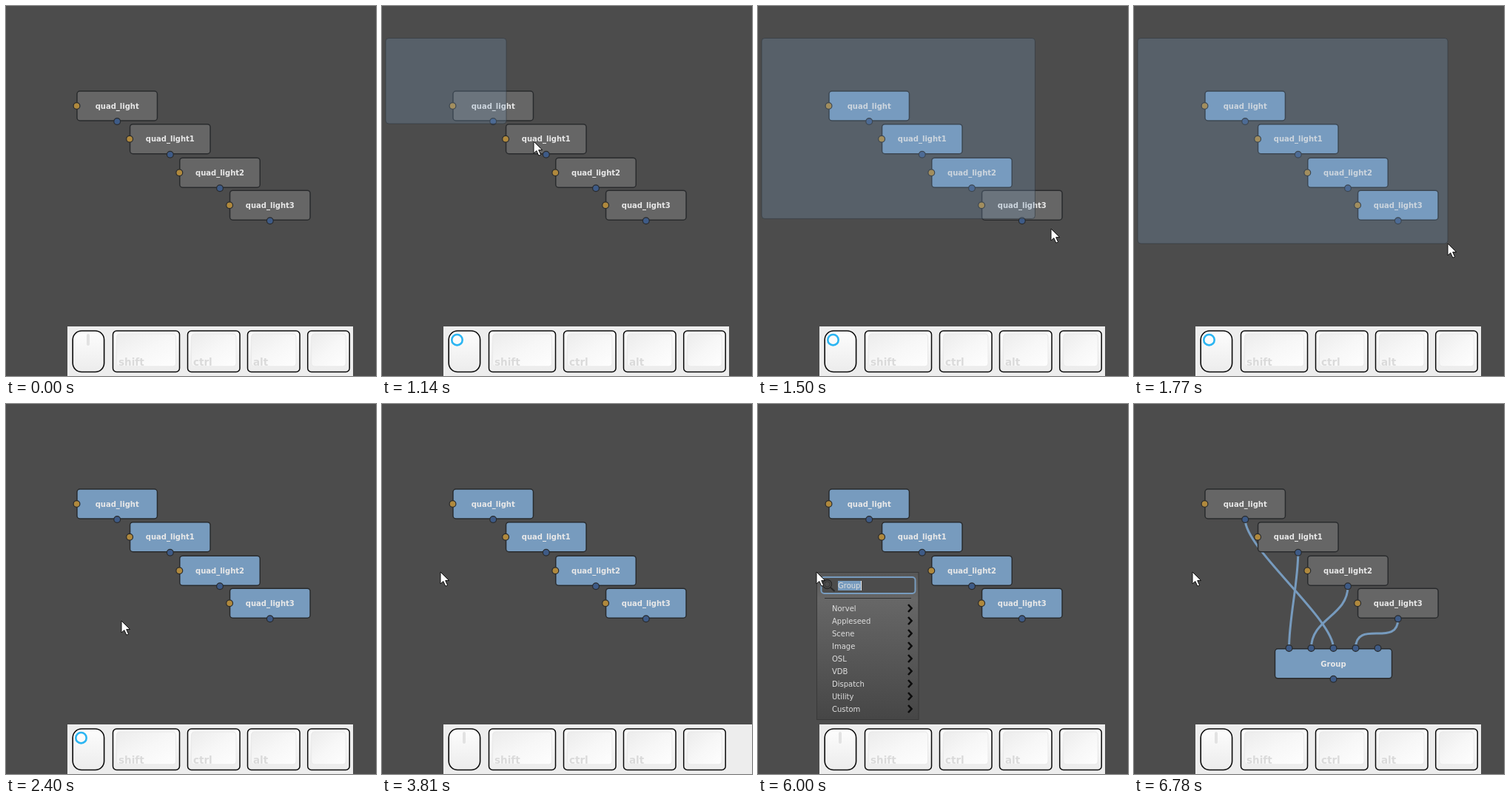
Animation, 500 px wide and 500 px high, one loop 8250 ms. Source, as an HTML page:

```html
<!DOCTYPE html>
<html lang="en">
<head>
<meta charset="utf-8">
<title>Grouping lights in a node graph</title>
<style>
  html, body { margin: 0; width: 100%; height: 100%; overflow: hidden; background: #4c4c4c; }
  svg { display: block; width: 100%; height: 100%; }
  text { font-family: "DejaVu Sans", sans-serif; font-size: 10px; fill: #dedede; }
  .title { font-weight: bold; text-anchor: middle; fill: #e8e8e8; }
  .node { stroke: #292b2d; stroke-width: 1.5; }
  .port { stroke: #292b2d; stroke-width: 1.2; }
  .wire { fill: none; stroke: #779bbe; stroke-width: 3; }
  .cap { font-weight: bold; font-size: 13.5px; fill: #dadada; }
  .cap.down { fill: #222; }
</style>
</head>
<body>
<svg id="stage" viewBox="0 0 500 500">
  <defs>
    <linearGradient id="menuFill" x1="0" y1="0" x2="0" y2="1">
      <stop offset="0" stop-color="#565656"/>
      <stop offset=".18" stop-color="#676767"/>
      <stop offset="1" stop-color="#464646"/>
    </linearGradient>
    <linearGradient id="keyFill" x1="0" y1="0" x2="0" y2="1">
      <stop offset="0" stop-color="#fdfdfd"/>
      <stop offset="1" stop-color="#ececec"/>
    </linearGradient>
    <linearGradient id="plateFill" x1="0" y1="0" x2="1" y2="1">
      <stop offset="0" stop-color="#ececec"/>
      <stop offset=".5" stop-color="#f7f7f7"/>
      <stop offset="1" stop-color="#fefefe"/>
    </linearGradient>
  </defs>
  <rect width="500" height="500" fill="#4c4c4c"/>
  <g id="wires"></g>
  <g id="nodes"></g>
  <rect id="marquee" x="5" y="43.5" rx="4" fill="#789bbe" fill-opacity=".25" stroke="#30363c" stroke-opacity=".6"/>
  <g id="menu"></g>
  <g id="keys"></g>
  <path id="pointer" d="M0 0V16L3.8 12.6L6.8 19.2L9.6 18L6.7 11.6H11.7Z" fill="#fff" stroke="#111" stroke-width="1" stroke-linejoin="round"/>
</svg>
<script>
const LOOP = 8250, STEP = 30;
const MOVE_IN = 480, PRESS = 840, RELEASE = 1980, RING_OFF = 2550;
const TAB_DOWN = 3240, TAB_UP = 3810, MENU_OPEN = 4320;
const ENTER_DOWN = 6210, GROUPED = 6240, ENTER_UP = 6780;
const GRAY = '#666666', BLUE = '#779bbe';

const byId = id => document.getElementById(id);

function add(parent, tag, attrs, label) {
  const el = document.createElementNS('http://www.w3.org/2000/svg', tag);
  for (const name in attrs) el.setAttribute(name, attrs[name]);
  if (label) el.textContent = label;
  parent.appendChild(el);
  return el;
}

const show = (el, on) => el.setAttribute('visibility', on ? 'visible' : 'hidden');

// Node graph
function port(parent, cx, cy, fill) {
  add(parent, 'circle', { cx, cy, r: 4.4, fill, class: 'port' });
}

function addNode(label, cx, cy, width) {
  const g = add(byId('nodes'), 'g', {});
  const body = add(g, 'rect', {
    x: cx - width / 2, y: cy - 20, width, height: 40, rx: 4, fill: GRAY, class: 'node'
  });
  add(g, 'text', { x: cx, y: cy + 3.7, class: 'title' }, label);
  port(g, cx, cy + 21, '#3e5b87');
  return { g, body, cx, cy, right: cx + width / 2, bottom: cy + 20 };
}

const lights = [[150.2, 135], [221.8, 179.7], [289, 225.2], [356.8, 269.2]].map(([x, y], i) => {
  const node = addNode('quad_light' + (i || ''), x, y, 108.5);
  port(node.g, x - 54.7, y, '#b0893d');
  return node;
});

const group = addNode('Group', 269.5, 350.8, 158);
group.body.setAttribute('fill', BLUE);
const inputX = i => 209.5 + 30 * i;
for (let i = 0; i < 5; i++) port(group.g, inputX(i), 330, '#3e5b87');

const wires = byId('wires');
[2, 0, 1, 3].forEach((slot, i) => {
  const { cx, bottom } = lights[i], y = bottom + 1, x = inputX(slot);
  add(wires, 'path', { class: 'wire', d: `M${cx} ${y}C${cx} ${y + 40} ${x} 290 ${x} 330` });
});

// Node menu
const menu = byId('menu');
add(menu, 'rect', { x: 79.5, y: 227.5, width: 137.5, height: 199, fill: 'url(#menuFill)', stroke: '#393939' });
add(menu, 'rect', { x: 85.5, y: 234, width: 127, height: 22, rx: 4, fill: '#4c4c4c', stroke: BLUE, 'stroke-width': 2 });
add(menu, 'circle', { cx: 93.5, cy: 243.5, r: 6, fill: 'none', stroke: '#292929', 'stroke-width': 1.4 });
add(menu, 'circle', { cx: 93.5, cy: 243.5, r: 3.6, fill: 'none', stroke: '#333' });
add(menu, 'path', { d: 'M98 248L103.5 253', stroke: '#292929', 'stroke-width': 2 });
add(menu, 'rect', { x: 108, y: 239, width: 31, height: 13, fill: BLUE });
add(menu, 'text', { x: 108, y: 249, fill: '#f0f0f0' }, 'Group');
const caret = add(menu, 'rect', { x: 139, y: 239, width: 1, height: 13, fill: '#f0f0f0' });
add(menu, 'path', { d: 'M90 262.5H207', stroke: '#303030' });
['Norvel', 'Appleseed', 'Scene', 'Image', 'OSL', 'VDB', 'Dispatch', 'Utility', 'Custom'].forEach((name, i) => {
  const y = 276 + 17 * i;
  add(menu, 'text', { x: 100, y: y + 4 }, name);
  add(menu, 'path', { d: `M203 ${y - 5}L207.5 ${y}L203 ${y + 5}`, fill: 'none', stroke: '#0c0c0c', 'stroke-width': 2.6 });
});

// Keyboard and mouse bar
const keys = byId('keys');
const bar = add(keys, 'rect', { x: 83, y: 433, width: 386, height: 67, fill: '#ededed' });

function addKey(x, width, label, down) {
  const g = add(keys, 'g', {});
  add(g, 'rect', { x, y: 439, width, height: 55.5, rx: 5, fill: 'url(#keyFill)', stroke: '#0a0a0a', 'stroke-width': 1.5 });
  add(g, 'rect', { x: x + 5, y: 443, width: width - 10, height: 44, rx: 4, fill: 'url(#plateFill)', stroke: '#e9e9e9' });
  if (label) add(g, 'text', { x: x + 7.5, y: 486, class: down ? 'cap down' : 'cap' }, label);
  return g;
}

add(keys, 'rect', { x: 90.2, y: 439, width: 42.4, height: 55.5, rx: 12, fill: 'url(#keyFill)', stroke: '#0a0a0a', 'stroke-width': 1.6 });
const wheel = add(keys, 'path', { d: 'M111 445V457', stroke: '#e2e2e2', 'stroke-width': 4, 'stroke-linecap': 'round' });
const ring = add(keys, 'circle', { cx: 101.5, cy: 451.2, r: 7.2, fill: '#fbfbfb', stroke: '#2bb5f2', 'stroke-width': 2.6 });
addKey(144.5, 90, 'shift');
addKey(245.5, 70.5, 'ctrl');
addKey(326.5, 70.5, 'alt');
const blankKey = addKey(407.7, 56.5);
const tabKey = addKey(408.5, 59.5, 'Tab', true);
const enterKey = addKey(408.5, 89, 'Enter', true);

// Pointer path: time, x, y
const route = [
  [450, -12, 42], [540, 5, 43], [810, 5, 43],
  [1080, 168, 159], [1140, 205, 183], [1290, 306, 247], [1350, 342, 267],
  [1500, 396, 301], [1650, 417, 317], [1710, 424, 321], [1950, 424, 321],
  [2070, 372, 320], [2220, 260, 311], [2340, 178, 297], [2400, 156, 293],
  [2460, 151, 289], [2580, 108, 251], [2670, 86, 232], [2730, 79, 227]
];

function pointerAt(t) {
  const i = route.findIndex(p => p[0] >= t);
  if (i < 0) return route[route.length - 1].slice(1);
  if (i === 0) return route[0].slice(1);
  const a = route[i - 1], b = route[i], k = (t - a[0]) / (b[0] - a[0]);
  return [a[1] + (b[1] - a[1]) * k, a[2] + (b[2] - a[2]) * k];
}

function draw(time) {
  const t = Math.floor(time / STEP) * STEP;
  const within = (from, to) => t >= from && t < to;

  const [x, y] = pointerAt(t);
  byId('pointer').setAttribute('transform', `translate(${x} ${y})`);
  show(byId('pointer'), t >= MOVE_IN);

  // The marquee trails the pointer by two steps.
  const [mx, my] = pointerAt(Math.min(t, RELEASE - STEP) - 2 * STEP);
  const marquee = byId('marquee');
  marquee.setAttribute('width', Math.max(0, mx - 5));
  marquee.setAttribute('height', Math.max(0, my - 43.5));
  show(marquee, within(PRESS + 2 * STEP, RELEASE));

  for (const { body, right, bottom } of lights) {
    const picked = within(PRESS, GROUPED) && mx >= right && my >= bottom;
    body.setAttribute('fill', picked ? BLUE : GRAY);
  }
  show(group.g, t >= GROUPED);
  show(wires, t >= GROUPED);

  const menuOpen = within(MENU_OPEN, ENTER_DOWN);
  show(menu, menuOpen);
  show(caret, menuOpen && Math.floor((t - MENU_OPEN) / 420) % 2 === 0);

  const clicking = within(PRESS, RING_OFF);
  const tab = within(TAB_DOWN, TAB_UP), enter = within(ENTER_DOWN, ENTER_UP);
  show(ring, clicking);
  show(wheel, !clicking);
  show(tabKey, tab);
  show(enterKey, enter);
  show(blankKey, !tab && !enter);
  bar.setAttribute('width', within(TAB_DOWN, MENU_OPEN) || enter ? 417 : 386);
}

const start = performance.now();
function tick() {
  draw((performance.now() - start) % LOOP);
  requestAnimationFrame(tick);
}
tick();
</script>
</body>
</html>
```
